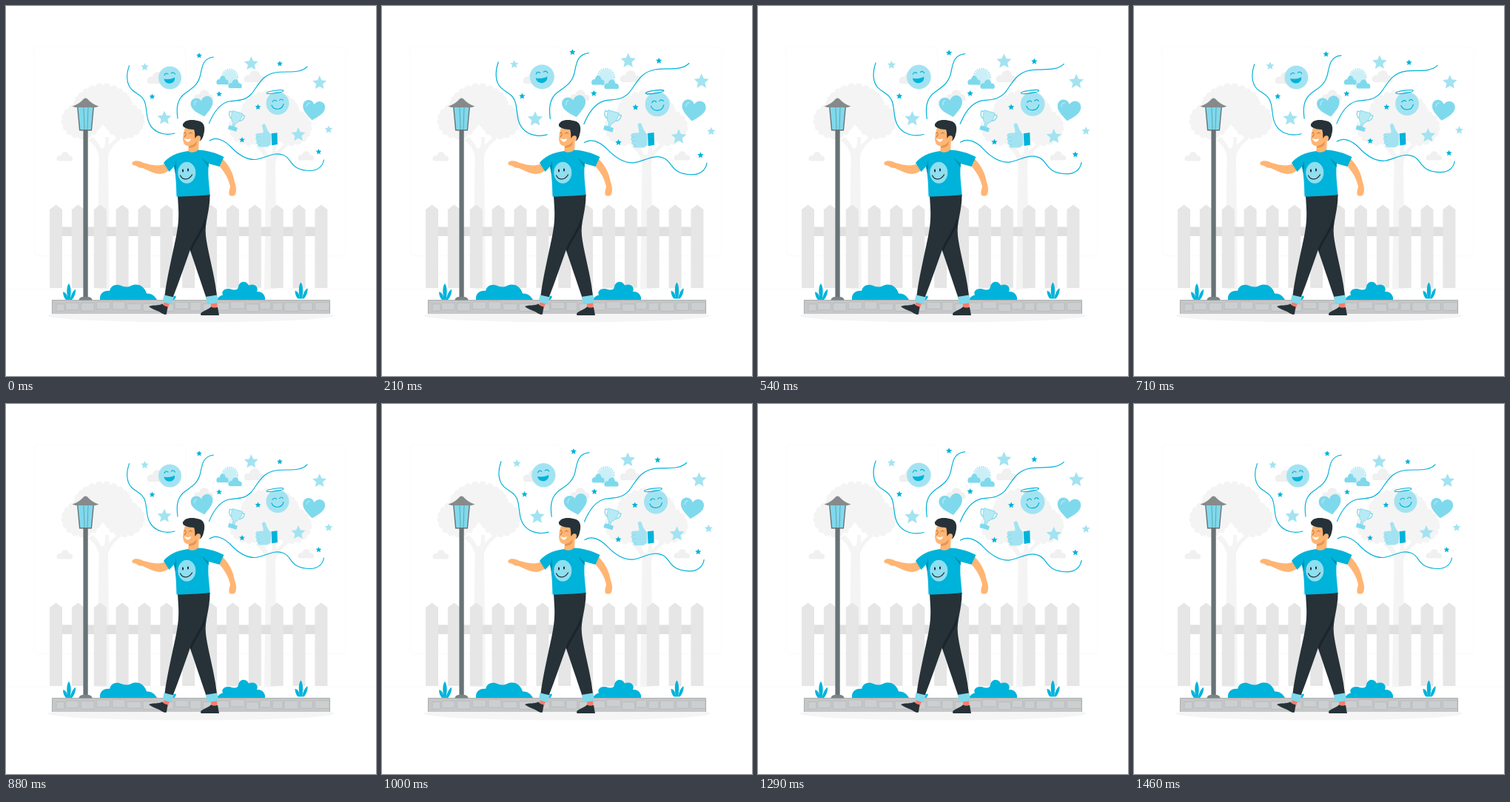
These frames come from a looping animation (500 px wide and 500 px high, 1.5 s). An HTML page:

```html
<!DOCTYPE html>
<html lang="en">
<head>
<meta charset="utf-8">
<title>Good mood walk</title>
<style>
html, body { margin: 0; width: 100%; height: 100%; overflow: hidden; background: #fff; }
svg { display: block; width: 100vw; height: 100vh; }
.main { fill: #00b3da; }
.light { fill: #a3e3f1; }
.mid { fill: #7fd9ec; }
.skin { fill: #ffb573; }
.dark { fill: #263238; }
.line { fill: none; stroke: #00b3da; stroke-width: 1.15; stroke-linecap: round; stroke-linejoin: round; }
</style>
</head>
<body>
<svg viewBox="0 0 500 500" xmlns="http://www.w3.org/2000/svg">
  <defs>
    <path id="cloud" d="M2 0C-2 -4 3 -9 6 -7C8 -15 17 -13 17 -7C21 -8 24 -3 21 0Z"/>
    <g id="heart">
      <path class="mid" d="M0 13.500C-8 7 -15 2 -15 -5C-15 -14 -4 -16 0 -8C4 -16 15 -14 15 -5C15 2 8 7 0 13.500Z"/>
      <path d="M-10 -4Q-10 -8 -6.500 -9" fill="none" stroke="#b8eaf4" stroke-width="1.200" stroke-linecap="round"/>
    </g>
    <g id="plant" class="main">
      <path d="M83.500 397C81.500 386 82 378 85 375C88.500 380 88 389 86.500 397Z"/>
      <path d="M83.500 397C83 390 80 386 77 386.500C77 391 79 395 81 397Z"/>
      <path d="M86.500 397C88 390 91 384 94 383C94.500 388 92 394 89 397Z"/>
    </g>
  </defs>

  <g fill="none" stroke="#ebebeb" stroke-width=".25">
    <rect x="38.2" y="55" width="204.5" height="282.8" rx="5.7"/>
    <rect x="254.5" y="55" width="204.5" height="282.8" rx="5.7"/>
    <path d="M0 382.5H500"/>
  </g>
  <g id="trees" fill="#f4f4f4"></g>
  <g fill="#f0f0f0">
    <use href="#cloud" x="68" y="209.5"/>
    <use href="#cloud" x="394" y="208.5"/>
    <use href="#cloud" transform="translate(190 105) scale(1.3)"/>
    <use href="#cloud" transform="translate(321 103) scale(1.3)"/>
    <use href="#cloud" transform="translate(254 128) scale(1.2)"/>
  </g>

  <path d="M68 298.500H430V311H68Z" fill="#e0e0e0"/>
  <g id="fence" fill="#e6e6e6"></g>

  <ellipse cx="250" cy="418.500" rx="193.500" ry="8.800" fill="#f5f5f5"/>
  <path class="main" d="M127 397C126 388 133 384 140 385C142 377 149 375 157 378.500C161 380 165 380 169 378C179 374 187 379 190 388.500C197 388 201 392 204 397Z"/>
  <path class="main" d="M285 397C287 393 290 391 293 390.500C290 384 298 380 305 383C310 384.500 314 383 314 379C316 371 325 371 328 377.500C336 374 342 380 339 386C346 385 351 391 350 397Z"/>
  <use href="#plant"/>
  <use href="#plant" x="313.500" y="-1.500"/>
  <path class="main" d="M214 397C218 396 220 392 223 391L224 393L229.500 391.500C230 394 229 396 227 397Z"/>

  <rect x="62" y="397" width="376" height="19" fill="#c5c7c8"/>
  <g id="stones" fill="#cccecf" stroke="#b6b9ba" stroke-width=".8"></g>
  <path d="M62.400 416V397.500H437.600V416" fill="none" stroke="#aeb1b2"/>

  <g fill="#687376">
    <path d="M104.400 166H110.700V394H104.400Z"/>
    <path d="M98.500 397.500C99 394 102 393 105 393H110C113 393 116 394 116.500 397.500Z" fill="#7a8385"/>
    <path d="M96 136H119L116 168.500H99Z"/>
    <path class="mid" d="M97.500 137H117.500L114.800 167H100.300Z"/>
    <path d="M105 137L106 167M111 137L110 167" stroke="#5f8c96" stroke-width=".7"/>
    <path d="M89.500 135.500C97 133 102 129 105 125.500Q107.500 123.500 110 125.500C113 129 118 133 125.500 135.500L121 137H94Z" fill="#858a8b"/>
  </g>

  <g id="curves">
    <path class="line" d="M166.500 80.600C162.500 92 162 105 170 113C177 119.500 186 121 188.500 133C191 146 190 156 197 164C205 173 217 175 228 172"/>
    <path class="line" d="M280.500 69C266 70.500 265 82 262.500 94C259 108 250 112 242 118C231 126 230 138 232 152"/>
    <path class="line" d="M274.500 158.500C280 145 289 132 301 129C311 127 322 129.500 332 118.500C341 107 346 93 364 90C380 87.500 397 92 407 82"/>
    <path class="line" d="M275 182C283 176 295 181 304 190.500C313 200 325 208 337 207.500C350 206 362 196 375 201.500C387 206 383 222 411 222.500C421 222.500 428 217 429.500 208"/>
  </g>
  <g id="stars"></g>

  <g id="faces">
    <circle class="light" cx="221.500" cy="97" r="15.500"/>
    <path class="main" d="M213.500 98.500C217 99.500 224 99 228 96.500C229.500 106 215 108 213.500 98.500Z"/>
    <path class="line" d="M214 93.500Q215.500 89.500 219 92M223.500 90.800Q226.500 88.500 228.500 92"/>
    <circle class="light" cx="367" cy="131.500" r="15.500"/>
    <path class="line" d="M359 134C362 141.500 373 141 375 132.500M360 129.500Q362.500 125.500 365.500 128.500M369.500 127.500Q372 124.500 374.500 127.500"/>
    <ellipse class="line" cx="363.500" cy="116" rx="11.500" ry="1.800" transform="rotate(-8 363.500 116)"/>
  </g>
  <g id="hearts">
    <use href="#heart" transform="translate(265.500 136) rotate(-11)"/>
    <use href="#heart" transform="translate(415.500 141) rotate(8)"/>
  </g>
  <g id="sun">
    <circle cx="302.500" cy="96" r="9.500" fill="#cbeff7"/>
    <circle cx="302.500" cy="96" r="10.500" fill="none" stroke="#a3e3f1" stroke-width="1.600" stroke-dasharray="1.700 1.100"/>
    <use href="#cloud" class="mid" transform="translate(284 106) scale(.75 .95)"/>
    <use href="#cloud" class="mid" transform="translate(300 111) scale(.85 .95)"/>
  </g>
  <g id="cup">
    <g transform="translate(309.500 155) rotate(17)" class="mid">
      <path d="M-7 -10H-10.500C-11 -5 -8 -2 -5 -1M7 -10H10.500C11 -5 8 -2 5 -1" fill="none" stroke="#7fd9ec" stroke-width="1.300"/>
      <path d="M-7 -12H7C7.500 -4 5 2 1.500 3V8H-1.500V3C-5 2 -7.500 -4 -7 -12Z" fill="#b8eaf4" stroke="#7fd9ec" stroke-width=".8"/>
      <path d="M-6 8H6V13.500H-6Z"/>
    </g>
  </g>
  <g id="thumb">
    <path class="light" d="M358 173C354 170 352 165 351 161C350 158.500 346 159 346 162C347 166 348 169 347.500 171.500L340 172C337 172.500 336.500 176 338.500 177C336.500 179 337 181 339 182C337.500 184 338 186.500 340.500 187C339.500 189 341 190.500 343 190.500H352C355 190.500 356 188 358 187.500Z"/>
    <path class="main" d="M358.500 172.300L366.500 171.300L367 187L359.200 188.200Z"/>
    <path d="M338.500 177H343M339 182H343.500M340.500 187H344.500" stroke="#85d6e8" stroke-width=".7"/>
  </g>

  <g id="walker">
    <path fill="#ff7d69" d="M214 400L221 402L218 410L211 406ZM277 399H285V409H277Z"/>
    <path class="dark" d="M193 406C199 403.500 206 405.500 211 402.500C213 405 216 406 218.500 406.500L217 416C216 418 213 416.500 211 415.500C206 411.500 198 410.500 193 406Z"/>
    <path class="dark" d="M263 416C264 412.500 272 411.500 277 406.500C280 408 283 408 286 407L288 418H263.500Z"/>
    <path class="dark" d="M246 322C254 345 263 372 270.500 394L285 391C282 363 272 330 270 310C268 293 276 276 275.500 255L250 261Z"/>
    <path class="dark" d="M232 256C233 276 235 287 230 311C224 340 217 370 214.500 391L225.500 394C234 372 242 349 249 329C257 310 267 300 269 284L275.500 255Z"/>
    <path d="M269 285C266 302 254 313 248.500 329L250.500 332C256 317 265 306 269 296Z" fill="#1b2529"/>
    <path class="mid" d="M213.500 390.500L227 393.500L223 403L211.500 399.500ZM269.500 393L285.500 390.500L287 401L272.500 403Z"/>

    <path class="skin" d="M216 213C206 218 194 214 186 212C181 209 174 208 171 211C169 214 172 215.500 175 215.500C178 218 181 219 185 219C193 223 203 227.500 209 227C214 226.500 219 224 224 219Z"/>
    <path class="skin" d="M282 211L292 206C301 214 307 226 309 238C311.500 245 311.500 250 310 254.500C308 257.500 303 257 302 255.500C300.500 252 302 249 303 244C301 234 296 225 287 215Z"/>
    <path class="skin" d="M247 187L246 199C250 203 258 201 260 195L261 179Z"/>
    <path class="main" d="M246 196C250 199 256 198 259.500 194.500C270 194.500 286 199 294.500 204L288.500 217L274 213C272 230 275 242 275.500 255C262 256.500 245 257.500 230.500 257.500C230 243 230 232 227 217L220.500 224L213 212C219 204 230 198 246 196Z"/>
    <path d="M274 213C270 211 267 207 265 205C268 211 271 214 273.500 218ZM227 217C229 214 229.500 211 229.500 208C231 215 230 222 229 226Z" fill="#008fb0"/>
    <ellipse cx="244.300" cy="225.300" rx="12" ry="14.500" fill="#8edff0"/>
    <path d="M235.500 229C239 236 247 235.500 251.500 228" fill="none" stroke="#263238" stroke-width="1.300" stroke-linecap="round"/>
    <path d="M239 221.500V223.500M246 220.500V222.500" stroke="#263238" stroke-width="2" stroke-linecap="round"/>

    <path d="M247 188.500C251 189 256 186 258 182L257 188C254 191.500 250 192 247 191.500Z" fill="#e8964f"/>
    <path class="skin" d="M242.500 163C240 170 238.500 178 239.500 183C240.500 188.500 246 190.500 250 188.500C254 187 257 184 258 181C263 183 266 177 262 174C262 170 260 162 258 161Z"/>
    <path class="dark" d="M240 163.500C237 159 241 158 242 156C247 153 255 153.500 261 155.500C267 157 269 163 268 169C267 175 266 180 261.500 183C264 177 262 174.500 259 175.500C257 176.500 256.500 178 255.500 179C255 174 255.500 170 254 167C249 167 244 166 240 163.500Z"/>
    <circle class="skin" cx="259.800" cy="178.800" r="3.200"/>
    <path d="M241 178.500C244 180.500 247.500 180.500 250 179C249 184.500 243 185.500 241 178.500Z" fill="#fff"/>
    <path d="M240.500 171.500Q242 170 243 171.500M247.500 172Q249.500 170 251.500 172M243.500 173L241.500 177" fill="none" stroke="#8c542c" stroke-width=".7" stroke-linecap="round"/>
  </g>
</svg>
<script>
const byId = id => document.getElementById(id);

function add(id, tag, attrs) {
  const el = document.createElementNS("http://www.w3.org/2000/svg", tag);
  for (const key in attrs) el.setAttribute(key, attrs[key]);
  byId(id).append(el);
}

// n points around an ellipse, with the radius scaled by wave(i)
function ring(n, cx, cy, rx, ry, wave = () => 1) {
  return Array.from({ length: n }, (_, i) => {
    const a = i / n * 2 * Math.PI - Math.PI / 2, q = wave(i);
    return `${(cx + rx * q * Math.cos(a)).toFixed(2)} ${(cy + ry * q * Math.sin(a)).toFixed(2)}`;
  });
}

// Three leafy lobes on a forked trunk that reaches the ground
function tree(x, y) {
  for (let k = -1; k <= 1; k++) {
    const side = Math.abs(k), n = 24 - 7 * side;
    const pts = ring(n, x + 29 * k, y + 21 * side, 39 - 13 * side, 25 - 3 * side);
    add("trees", "path", { d: "M" + [...pts, pts[0]].join("A5 5 0 0 1 ") + "Z" });
  }
  add("trees", "path", {
    d: `M${x - 8} 382L${x - 5.5} ${y + 69}Q${x - 8} ${y + 56} ${x - 20} ${y + 47}L${x - 14} ${y + 43}`
      + `Q${x - 6} ${y + 50} ${x - 3} ${y + 58}H${x + 1}Q${x + 4} ${y + 52} ${x + 3} ${y + 43}H${x + 8}`
      + `V${y + 54}L${x + 20} ${y + 42}L${x + 25} ${y + 45}Q${x + 8} ${y + 58} ${x + 7} ${y + 70}L${x + 9} 382Z`
  });
}
tree(131, 134);
tree(357, 143);

for (let i = 0; i < 13; i++)
  add("fence", "path", { d: `M${59 + i * 29.87} 381v-106l8.5 -6.5l8.5 6.5v106Z` });

let seed = 7;
const rand = (lo, hi) => {
  seed = (seed * 16807) % 2147483647;
  return lo + (hi - lo) * seed / 2147483647;
};
for (let x = 68; x < 425;) {
  const width = rand(11, 20);
  add("stones", "rect", { x, y: rand(399, 403), width, height: rand(8.5, 12), rx: .6 });
  x += width + rand(1, 4);
}

function star(cls, x, y, r) {
  add("stars", "polygon", { class: cls, points: ring(10, x, y, r, r, i => i % 2 ? .47 : 1).join(" ") });
}
[[331.3, 78], [423.7, 104], [214, 151.5], [395, 174]].forEach(p => star("light", ...p, 10));
[[187.5, 82.5], [436, 167]].forEach(p => star("light", ...p, 5.6));
[[261, 67], [370, 78], [197.5, 122.5], [288, 119], [340.5, 136.5], [319, 181], [422.5, 197]]
  .forEach(p => star("main", ...p, 4.1));

// Every group beats around its own centre
const centres = {
  curves: [297, 145.8], stars: [311.4, 132], faces: [294.4, 114.5], hearts: [340.5, 137.5],
  sun: [301.5, 97.5], cup: [310, 155], thumb: [352, 175]
};
const LOOP = 1500, FPS = 24, LAST = 35;

// A slow fall sits between two quick rises: peaks at .2 and .8, rest at 0, .6 and 1
function scaleAt(p) {
  const swell = p < .2 ? p / .2 : p < .6 ? (.6 - p) / .4 : 1 - Math.abs(p - .8) / .2;
  return 1 + .1 * swell;
}

function draw(ms) {
  const step = Math.min(LAST, Math.floor((ms % LOOP + 5) * FPS / 1000));
  const s = scaleAt(step / LAST);
  for (const id in centres) {
    const [x, y] = centres[id];
    byId(id).setAttribute("transform", `translate(${x} ${y}) scale(${s}) translate(${-x} ${-y})`);
  }
}

let start;
function tick(now) {
  start ??= now;
  draw(now - start);
  requestAnimationFrame(tick);
}
draw(0);
requestAnimationFrame(tick);
</script>
</body>
</html>
```
